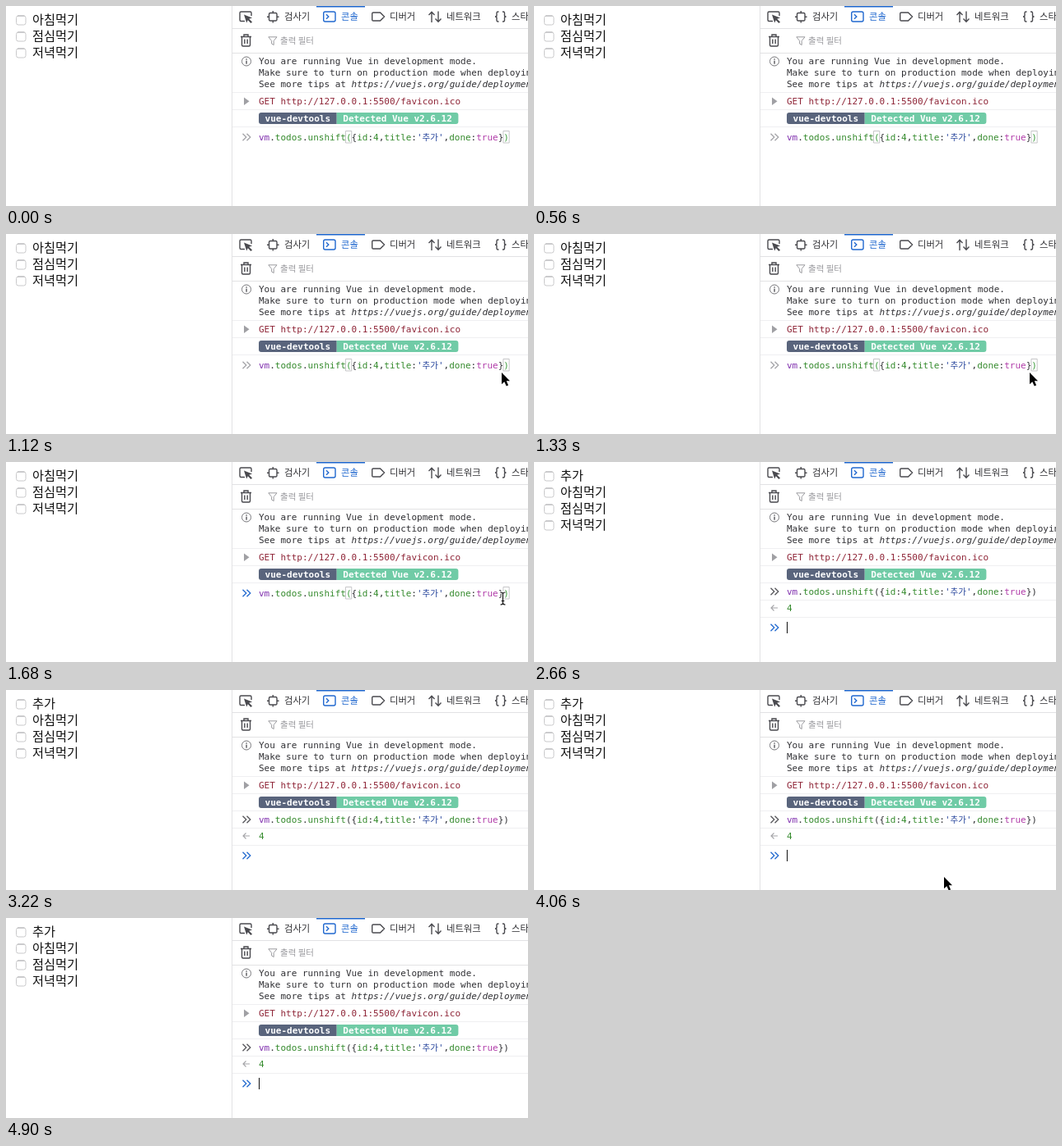
These frames come from a looping animation (634 by 244 pixels, 5040 ms). An HTML page with a canvas:

```html
<!DOCTYPE html>
<html lang="ko">
<head>
<meta charset="utf-8">
<title>Console todo list</title>
<style>
html, body { margin: 0; width: 100%; height: 100%; overflow: hidden; background: #fff; }
canvas { display: block; }
</style>
</head>
<body>
<canvas id="stage" width="634" height="244"></canvas>
<script>
const ctx = document.getElementById('stage').getContext('2d');
const LOOP = 5040, STEP = 70;
const MONO = '"DejaVu Sans Mono", monospace';
const KOREAN = '"Noto Sans CJK KR", "Noto Sans CJK", "Noto Sans KR", sans-serif';
const CODE = '11px ' + MONO;
const CHAR = 6.62;
const C = {
  text: '#303034', icon: '#4a4a4f', line: '#e2e2e4', soft: '#efeff1',
  blue: '#2068cf', muted: '#9b9b9f', error: '#8f2638',
  green: '#348a2c', purple: '#8030ae', string: '#27459c', atom: '#b03aa8'
};

// Timeline in ms
const FOCUS = 1470, ENTER = 2590;
const caretOn = t => t >= 2030 && t < 3220 || t >= 3780 && t < 4340 || t >= 4900;
const pointerIn = [[840, 613, 216], [910, 609, 198], [980, 605, 181], [1050, 602, 171], [1120, 602, 169]];
const pointerOut = [[3710, 604, 166], [3850, 563, 190], [4060, 498, 228], [4200, 478, 246]];

function along(points, t) {
  const last = points[points.length - 1];
  if (t >= last[0]) return last.slice(1);
  const i = points.findIndex(p => p[0] > t);
  const a = points[i - 1], b = points[i], k = (t - a[0]) / (b[0] - a[0]);
  return [a[1] + (b[1] - a[1]) * k, a[2] + (b[2] - a[2]) * k];
}

function text(str, x, y, color = C.text, font = CODE) {
  ctx.font = font;
  ctx.fillStyle = color;
  ctx.fillText(str, x, y);
}

function rect(x, y, w, h, color) {
  ctx.fillStyle = color;
  ctx.fillRect(x, y, w, h);
}

function stroke(d, color = C.icon, width = 1.4) {
  ctx.strokeStyle = color;
  ctx.lineWidth = width;
  ctx.stroke(new Path2D(d));
}

function fill(d, color) {
  ctx.fillStyle = color;
  ctx.fill(new Path2D(d));
}

function roundRect(x, y, w, h, r, color, width = 1.4) {
  ctx.beginPath();
  ctx.roundRect(x, y, w, h, r);
  ctx.strokeStyle = color;
  ctx.lineWidth = width;
  ctx.stroke();
}

function checkbox(y) {
  roundRect(12.5, y - 5, 11.5, 11, 2.5, '#c9c9cb', 1);
  rect(14, y - 5.5, 8.5, 1, '#b4b4b6');
}

function list(added) {
  const items = ['아침먹기', '점심먹기', '저녁먹기'];
  if (added) items.unshift('추가');
  items.forEach((item, i) => {
    checkbox(17 + i * 20);
    text(item, 32, 22 + i * 20, '#111', '15.2px ' + KOREAN);
  });
}

function tabs() {
  const label = (str, x, color) => text(str, x, 17, color, '11.3px ' + KOREAN);
  rect(377, 0, 59, 1.5, C.blue);

  stroke('M290 18.5H285.5Q284 18.5 284 17V8.5Q284 7 285.5 7H296.500Q298 7 298 8.500V12');
  fill('M289 10.5L299 14.5L295.2 15.8L299 19.5L297.4 21L293.800 17.200L292.200 20.500Z', C.icon);

  roundRect(319.500, 8.500, 9.500, 9.500, 1.5, C.icon);
  stroke('M324.250 6V8.500M324.250 18V20.500M317 13.250H319.500M329 13.250H331.500');
  label('검사기', 338);

  roundRect(385.700, 7, 14.300, 12, 2, C.blue);
  stroke('M389 10.300L391.800 13L389 15.700', C.blue);
  label('콘솔', 407, C.blue);

  stroke('M446 8H454.500L459.500 13L454.500 18H446Q444.700 18 444.700 16.700V9.300Q444.700 8 446 8Z');
  label('디버거', 466);

  stroke('M517 20V7.500M513.500 11L517 7.300L520.500 11M525 6.500V19M521.500 15.500L525 19.200L528.500 15.500');
  label('네트워크', 535);

  stroke('M598.500 7H597.500Q596 7 596 8.500V11.500Q596 13 594 13Q596 13 596 14.500V17.500Q596 19 597.500 19H598.500');
  stroke('M603 7H604Q605.500 7 605.500 8.500V11.500Q605.500 13 607.500 13Q605.500 13 605.500 14.500V17.500Q605.500 19 604 19H603');
  label('스타일 편집기', 614);
}

function filterBar() {
  stroke('M285 37.500H298M289 37V35H294V37M286.500 38V47.500Q286.500 49 288 49H295Q296.500 49 296.500 47.500V38M289.800 40.500V46M293.200 40.500V46');
  stroke('M318.800 37.800H329L325.200 42.500V47.500L322.600 46V42.500Z', C.muted, 1);
  text('출력 필터', 333, 46, C.muted, '10.5px ' + KOREAN);
}

function badge(x, w, radii, color, str) {
  ctx.beginPath();
  ctx.roundRect(x, 130, w, 14, radii);
  ctx.fillStyle = color;
  ctx.fill();
  text(str, x + 1 + CHAR, 141, '#fff', 'bold ' + CODE);
}

function messages() {
  ctx.beginPath();
  ctx.arc(292, 67.500, 5.500, 0, Math.PI * 2);
  ctx.strokeStyle = '#77777b';
  ctx.lineWidth = 1;
  ctx.stroke();
  rect(291.400, 64.300, 1.300, 1.400, C.icon);
  rect(291.400, 66.700, 1.300, 4, C.icon);

  text('You are running Vue in development mode.', 307, 71);
  text('Make sure to turn on production mode when deploying for production.', 307, 85);
  text('See more tips at ', 307, 99);
  text('https://vuejs.org/guide/deployment.html', 307 + 17 * CHAR, 99, C.text, 'italic ' + CODE);

  fill('M289 111.500L295.500 116.200L289 121Z', '#a0a0a4');
  text('GET http://127.0.0.1:5500/favicon.ico', 307, 120, C.error);

  badge(307, 94.700, [3, 0, 0, 3], '#59647c', 'vue-devtools');
  badge(401.700, 147.700, [0, 3, 3, 0], '#70cba6', 'Detected Vue v2.6.12');
}

function command(y, matching) {
  const bracket = matching ? '#3f9d3f' : C.text;
  const parts = [
    ['vm', C.purple], ['.', C.text], ['todos', C.green], ['.', C.text], ['unshift', C.green],
    ['(', bracket], ['{', C.text], ['id', C.green], [':', C.text], ['4', C.green], [',', C.text],
    ['title', C.green], [':', C.text], ["'", C.string], ['추가', C.string], ["'", C.string],
    [',', C.text], ['done', C.green], [':', C.text], ['true', C.atom], ['}', C.text], [')', bracket]
  ];
  let x = 307;
  for (const [str, color] of parts) {
    const hangul = str === '추가';
    text(str, x, y, color, hangul ? '10.5px ' + KOREAN : CODE);
    if (matching && '()'.includes(str)) roundRect(x - .4, y - 11.500, CHAR + .6, 14.500, 0, '#b9b9bb', .8);
    x += hangul ? 19.300 : str.length * CHAR;
  }
}

function chevrons(y, color) {
  for (const x of [287.500, 292.500]) {
    stroke(`M${x} ${y - 4.300}L${x + 4.300} ${y}L${x} ${y + 4.300}`, color, 1.3);
  }
}

function prompt(t) {
  if (t < ENTER) {
    chevrons(160, t < FOCUS ? '#a4a4a8' : C.blue);
    command(164, true);
    if (caretOn(t)) rect(611, 153, 1, 14, '#111');
    return;
  }
  chevrons(158, '#55555a');
  command(162, false);
  rect(275, 168, 359, 1, C.soft);
  stroke('M296 178H288M291.500 174.500L288 178L291.500 181.500', '#a4a4a8', 1.1);
  text('4', 307, 182, C.green);
  rect(275, 189, 359, 1, C.soft);
  chevrons(202, C.blue);
  if (caretOn(t)) rect(307, 195, 1, 14, '#111');
}

function shape(d, x, y, paint) {
  ctx.save();
  ctx.translate(x, y);
  paint(d);
  ctx.restore();
}

function arrow(x, y) {
  shape('M0 0V14.200L3.300 11.200L5.700 16.500L8.100 15.500L5.800 10.300H10Z', x, y, d => {
    stroke(d, '#fff', 2);
    fill(d, '#000');
  });
}

function beam(x, y) {
  shape('M-3 -7.500Q0 -7.500 0 -5.500Q0 -7.500 3 -7.500M0 -5.500V5.500M-3 7.500Q0 7.500 0 5.500Q0 7.500 3 7.500M-1.800 3H1.800', x, y, d => {
    stroke(d, '#fff', 2.8);
    stroke(d, '#111', 1.2);
  });
}

function pointer(t) {
  if (t >= 840 && t < 1400) arrow(...along(pointerIn, t));
  else if (t >= 1400 && t < ENTER) beam(603.500, 166.500);
  else if (t >= 3710 && t < 4200) {
    const [x, y] = along(pointerOut, t);
    (t < 3780 ? beam : arrow)(x, y);
  }
}

function draw(t) {
  rect(0, 0, 634, 244, '#fff');
  list(t >= ENTER);
  rect(274, 0, 1, 244, C.line);
  for (const y of [27, 57]) rect(275, y, 359, 1, C.line);
  for (const y of [105, 126, 147]) rect(275, y, 359, 1, C.soft);
  tabs();
  filterBar();
  messages();
  prompt(t);
  pointer(t);
}

const start = performance.now();
function frame() {
  const t = (performance.now() - start) % LOOP;
  draw(Math.floor(t / STEP) * STEP);
  requestAnimationFrame(frame);
}
frame();
</script>
</body>
</html>
```
